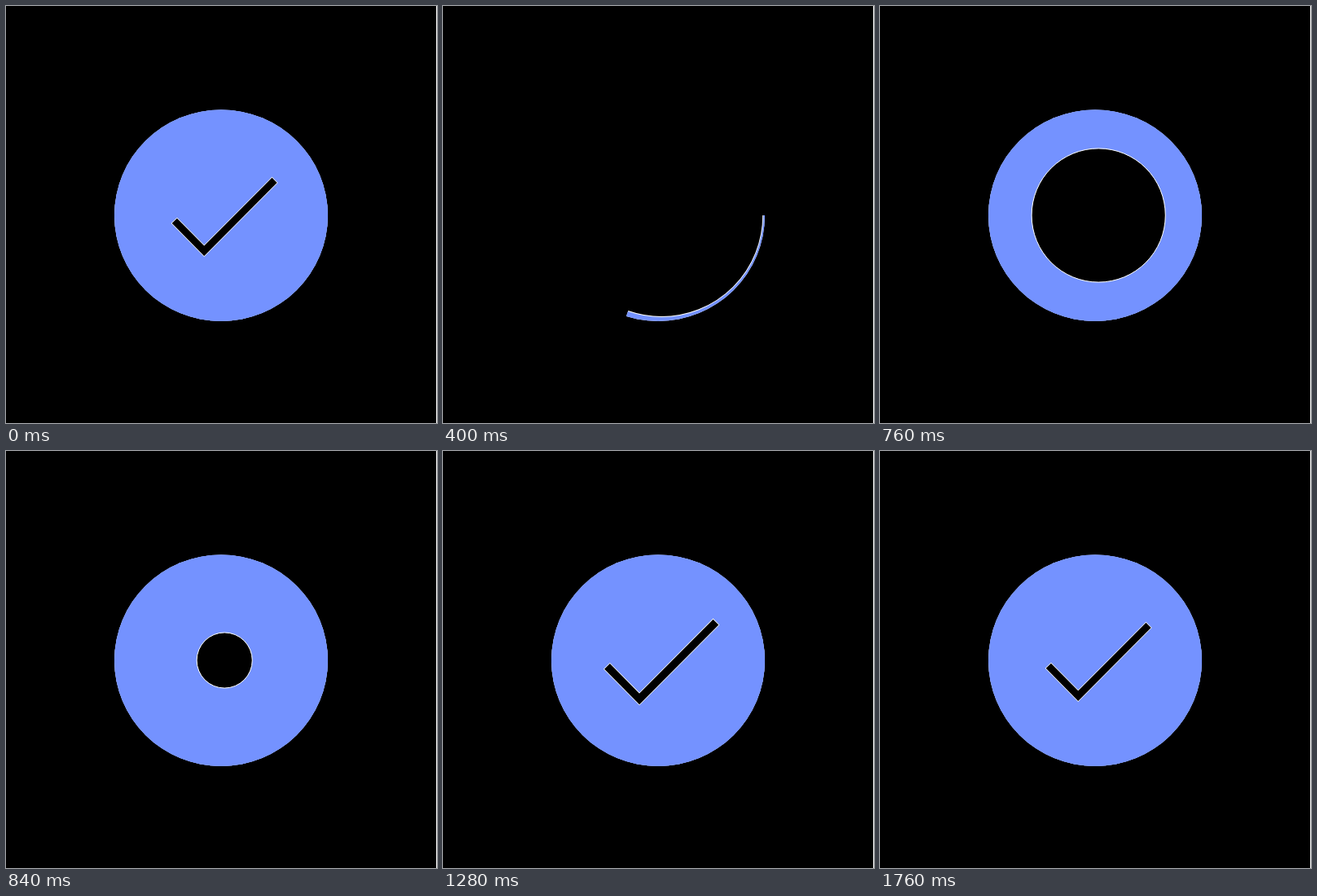
Animation, 529 px wide and 512 px high, one loop 1940 ms. Source, as an HTML page with a canvas:

```html
<!DOCTYPE html>
<html lang="en">
<head>
<meta charset="utf-8">
<title>Checkmark</title>
<style>
  html, body { margin: 0; width: 100%; height: 100%; overflow: hidden; background: #000; }
  canvas { display: block; }
</style>
</head>
<body>
<canvas id="stage" width="529" height="512"></canvas>
<script>
const ctx = document.getElementById('stage').getContext('2d');
const WIDTH = 529, HEIGHT = 512;
const LOOP = 1940, STEP = 40;
const BLUE = '#7492ff';
const CX = 268.2, CY = 257, UNIT = 5.2;

// Playback time in ms -> animation clock in seconds
const CLOCK = [[84, 0], [400, .265], [680, .49], [840, .648], [1120, .882], [1440, 1.143], [1510, 1.2]];

function clockAt(ms) {
  if (ms <= CLOCK[0][0]) return 0;
  for (let i = 1; i < CLOCK.length; i++) {
    const [t0, c0] = CLOCK[i - 1], [t1, c1] = CLOCK[i];
    if (ms <= t1) return c0 + (c1 - c0) * (ms - t0) / (t1 - t0);
  }
  return 1.2;
}

const clamp = v => Math.min(1, Math.max(0, v));

// cubic-bezier(x1, 0, x2, 1)
function bezier(x1, x2) {
  return x => {
    if (x <= 0 || x >= 1) return clamp(x);
    let lo = 0, hi = 1;
    for (let i = 0; i < 24; i++) {
      const u = (lo + hi) / 2, v = 1 - u;
      if (3 * v * v * u * x1 + 3 * v * u * u * x2 + u * u * u < x) lo = u; else hi = u;
    }
    return lo * lo * (3 - 2 * lo);
  };
}
const strokeEase = bezier(.65, .45);
const easeInOut = bezier(.42, .58);

function stroke(color, width) {
  ctx.strokeStyle = color;
  ctx.lineWidth = width;
  ctx.stroke();
}

function drawRing(clock) {
  const length = 166 * strokeEase(clamp(clock / .6));
  const angle = Math.min(Math.PI * 2, length / 25);
  if (angle <= 0) return;
  ctx.beginPath();
  ctx.arc(CX, CY, 25 * UNIT, 0, angle);
  stroke('#fff', 12);
  stroke(BLUE, 10.2);
}

function drawFill(clock) {
  const radius = 135.5 - 145 * easeInOut(clamp((clock - .4) / .4));
  if (radius > 130) return;
  const hole = new Path2D();
  if (radius > 0) hole.arc(CX, CY, radius, 0, Math.PI * 2);
  const fill = new Path2D(hole);
  fill.rect(0, 0, WIDTH, HEIGHT);
  ctx.fillStyle = BLUE;
  ctx.fill(fill, 'evenodd');
  ctx.strokeStyle = '#fff';
  ctx.lineWidth = 1;
  ctx.stroke(hole);
}

function drawCheck(clock) {
  const length = Math.min(33.8, 48 * strokeEase(clamp((clock - .8) / .3))) * UNIT;
  if (length < 2) return;
  const pulse = clamp((clock - .9) / .3) * 2;
  const scale = 1 + .1 * easeInOut(pulse < 1 ? pulse : 2 - pulse);
  const edge = .7;
  ctx.save();
  ctx.translate(CX, CY);
  ctx.scale(scale, scale);
  ctx.beginPath();
  ctx.moveTo(-11.9 * UNIT, 1.2 * UNIT);
  ctx.lineTo(-4.8 * UNIT, 8.4 * UNIT);
  ctx.lineTo(11.9 * UNIT, -8.4 * UNIT);
  ctx.setLineDash([length, 400]);
  stroke('#fff', 10.2);
  ctx.setLineDash([0, edge, length - 2 * edge, 400]);
  stroke('#000', 8.8);
  ctx.restore();
}

function draw(ms) {
  const clock = ms < STEP ? 1.2 : clockAt(ms);
  ctx.fillStyle = '#000';
  ctx.fillRect(0, 0, WIDTH, HEIGHT);
  ctx.save();
  ctx.beginPath();
  ctx.ellipse(264, 257.2, 131, 129.8, 0, 0, Math.PI * 2);
  ctx.clip();
  drawRing(clock);
  drawFill(clock);
  drawCheck(clock);
  ctx.restore();
  // Thin white line along the right edge
  ctx.fillStyle = '#fff';
  ctx.fillRect(WIDTH - 1, 0, 1, HEIGHT);
}

const start = performance.now();
function tick() {
  const ms = (performance.now() - start) % LOOP;
  draw(Math.floor(ms / STEP) * STEP);
  requestAnimationFrame(tick);
}
tick();
</script>
</body>
</html>
```
